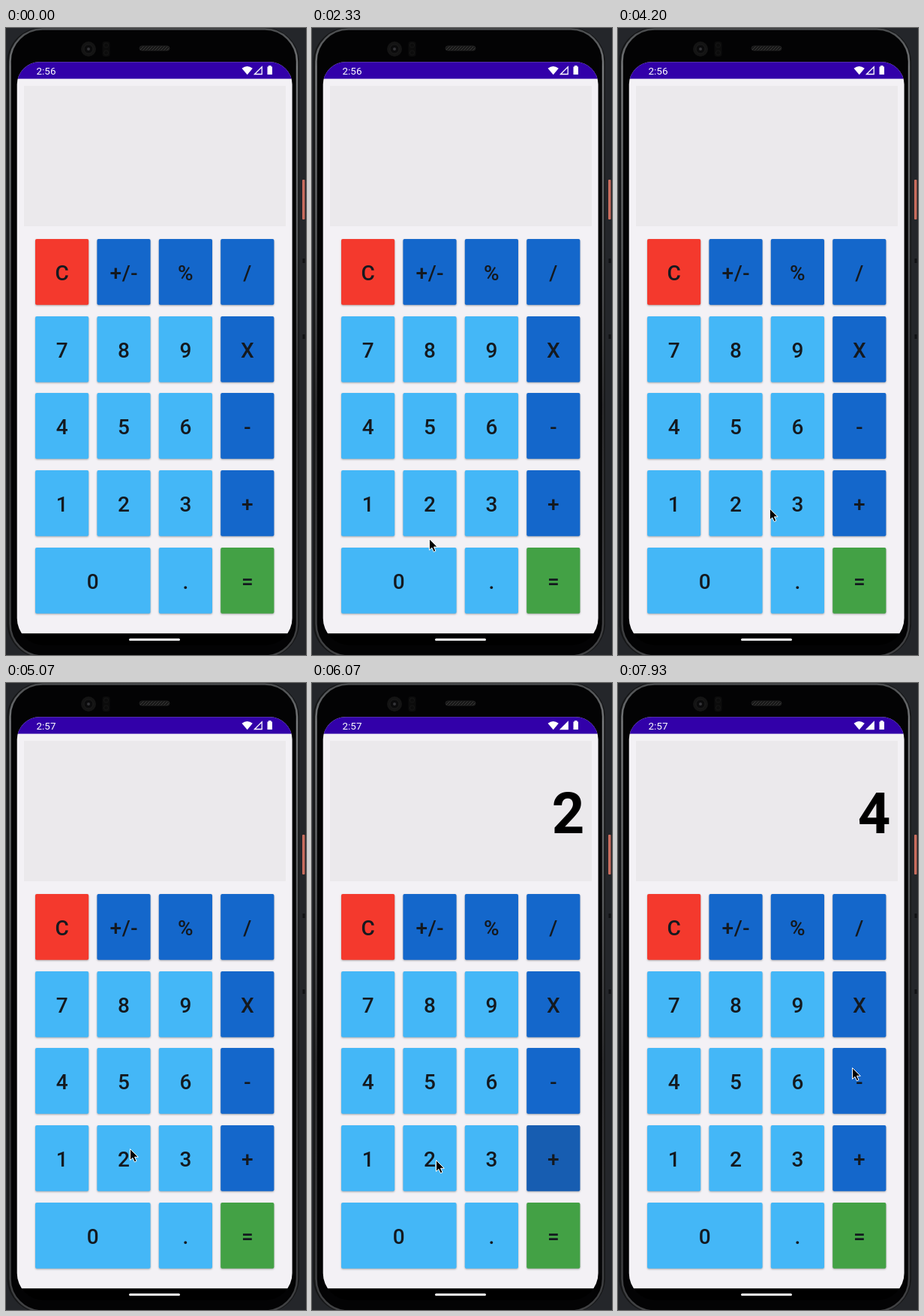
An HTML page for the animation above (8 s loop, 400 by 835 pixels).

```html
<!DOCTYPE html>
<html lang="en">
<head>
<meta charset="utf-8">
<title>Calculator</title>
<style>
html, body { margin: 0; width: 100%; height: 100%; overflow: hidden; background: #24262a; }
svg { display: block; width: 100%; height: 100%; }
text { font-family: Roboto, sans-serif; }
.key { filter: drop-shadow(0 1.5px 1px rgba(0, 0, 0, .3)); }
.label { font-size: 28px; font-weight: 500; letter-spacing: .6px; fill: #14191f; text-anchor: middle; }
</style>
</head>
<body>
<svg viewBox="0 0 400 835" xmlns="http://www.w3.org/2000/svg">
  <defs>
    <linearGradient id="rim" x1="0" y1="0" x2="0" y2="1">
      <stop offset="0" stop-color="#4a4c4e"/>
      <stop offset=".06" stop-color="#77797b"/>
      <stop offset=".35" stop-color="#56585a"/>
      <stop offset=".6" stop-color="#2c2c2e"/>
      <stop offset="1" stop-color="#404143"/>
    </linearGradient>
    <pattern id="grill" width="4" height="4" patternUnits="userSpaceOnUse">
      <rect width="4" height="4" fill="#171717"/>
      <path d="M0 4L4 0" stroke="#3a3a3a"/>
    </pattern>
    <clipPath id="screen">
      <path d="M14.700 75A30 30 0 0 1 44.700 45.300H351.600A30 30 0 0 1 381.600 75V786A36 36 0 0 1 345.600 822H50.700A36 36 0 0 1 14.700 786Z"/>
    </clipPath>
  </defs>

  <rect width="400" height="835" fill="#24262a"/>
  <rect x="1.500" y="-.5" width="389.500" height="839" rx="46" fill="#161718"/>
  <rect x="5.500" y="1.500" width="382.500" height="835" rx="43" fill="#030304" stroke="url(#rim)" stroke-width="2.500"/>
  <rect x="395" y="202" width="3.500" height="53" rx="1" fill="#c96d5e"/>
  <path d="M397 307v6M397 408v6" stroke="#101113" stroke-width="3"/>
  <circle cx="110" cy="28" r="10" fill="#141414"/>
  <circle cx="110" cy="28" r="6" fill="#0b0b0c" stroke="#1c1c1c"/>
  <circle cx="110" cy="28" r="2" fill="#343438"/>
  <rect x="128.500" y="18" width="10" height="20" rx="3" fill="#0c0c0c"/>
  <circle cx="133.500" cy="23" r="3" fill="none" stroke="#161616"/>
  <circle cx="133.500" cy="33" r="3" fill="none" stroke="#161616"/>
  <rect x="178" y="24" width="40" height="6" rx="3" fill="url(#grill)" stroke="#202020"/>

  <g clip-path="url(#screen)">
    <rect x="14" y="45" width="368" height="761.500" fill="#f3f1f5"/>
    <rect x="14" y="45" width="368" height="22.600" fill="#3200a9"/>
    <rect x="14" y="806.500" width="368" height="20" fill="#000"/>
  </g>
  <text id="clock" x="40.600" y="62" font-size="13.400" fill="#fff"></text>
  <path d="M314.500 53.800Q321.500 48 328.800 53.800L321.700 62.300Z" fill="#fff"/>
  <path id="signal" d="M331.500 61.500L341.200 51.800V61.500Z" stroke="#fff" stroke-width="1.300"/>
  <path d="M348.500 51.500H350V50H353.500V51.500H355V62H348.500Z" fill="#fff"/>
  <rect x="24" y="77" width="349" height="187" fill="#ebe9ec"/>
  <text id="display" x="363.400" y="200.300" font-size="76" font-weight="700" text-anchor="end"></text>
  <g id="keys"></g>
  <rect x="164" y="813" width="68" height="3" rx="1.500" fill="#f4f4f4"/>
  <path id="cursor" d="M.5 .5V15.500L3.900 12.400L6.400 17.800L9 16.600L6.600 11.300H11.300Z"
    fill="#000" stroke="#fff" stroke-width="1"/>
</svg>
<script>
const LOOP = 8000, STEP = 200 / 3;
const $ = id => document.getElementById(id);
const clamp = v => Math.max(0, Math.min(1, v));

function add(parent, tag, attrs, text = '') {
  const el = document.createElementNS('http://www.w3.org/2000/svg', tag);
  for (const name in attrs) el.setAttribute(name, attrs[name]);
  el.textContent = text;
  parent.append(el);
  return el;
}

const colors = { C: '#f4392d', '=': '#43a145' };
const rows = [['C', '+/-', '%', '/'], ['7', '8', '9', 'X'], ['4', '5', '6', '-'],
  ['1', '2', '3', '+'], ['0', null, '.', '=']];
const keys = {};

rows.forEach((row, r) => row.forEach((name, c) => {
  if (!name) return;
  const x = 39 + c * 82.4, y = Math.floor(281.4 + r * 102.65), width = name === '0' ? 153.6 : 71.2;
  const fill = colors[name] || (c === 3 || r === 0 ? '#1467cb' : '#44b7f7');
  const box = { x, y, width, height: 87.7, rx: 2 };
  add($('keys'), 'rect', { ...box, fill, class: 'key' });
  const clip = add($('keys'), 'clipPath', { id: `clip${r}${c}` });
  add(clip, 'rect', box);
  keys[name] = add($('keys'), 'circle', { fill: '#262b30', opacity: 0, 'clip-path': `url(#clip${r}${c})` });
  add($('keys'), 'text', { x: x + width / 2 + .3, y: y + 55, class: 'label' }, name);
}));

// time, x, y of the pointer tip
const path = [[930, 18, 790], [1300, 104, 712], [1700, 104, 712], [3000, 212, 645],
  [3900, 212, 645], [4900, 165, 620], [5330, 165, 620], [5600, 318, 636],
  [5780, 318, 636], [6020, 165, 635], [6620, 165, 635], [6920, 320, 731],
  [7160, 320, 731], [7700, 312, 512], [LOOP, 312, 512]];
const presses = [[5270, '2', 165, 622], [5700, '+', 318, 636], [6560, '2', 165, 635], [7030, '=', 320, 731]];

function pointerAt(t) {
  const i = Math.max(1, path.findIndex(p => p[0] > t));
  const [t0, x0, y0] = path[i - 1], [t1, x1, y1] = path[i];
  const k = clamp((t - t0) / (t1 - t0)), e = k * k * (3 - 2 * k);
  return [x0 + (x1 - x0) * e, y0 + (y1 - y0) * e];
}

function draw(t) {
  $('clock').textContent = t < 4400 ? '2:56' : '2:57';
  $('signal').setAttribute('fill', t < 5600 ? 'none' : '#fff');
  $('display').textContent = t < 5330 ? '' : t < 7040 ? '2' : '4';
  $('cursor').style.display = t < path[0][0] ? 'none' : '';
  $('cursor').setAttribute('transform', `translate(${pointerAt(t)})`);
  for (const name in keys) keys[name].setAttribute('opacity', 0);
  for (const [start, name, cx, cy] of presses) {
    const age = t - start;
    if (age < 0 || age > 700) continue;
    const ripple = keys[name];
    ripple.setAttribute('cx', cx);
    ripple.setAttribute('cy', cy);
    ripple.setAttribute('r', 110 * clamp(age / 260));
    ripple.setAttribute('opacity', .2 * clamp(age / 70) * clamp((700 - age) / 400));
  }
}

function tick() {
  const t = performance.now() % LOOP;
  draw(Math.floor(t / STEP + .1) * STEP);
  requestAnimationFrame(tick);
}
tick();
</script>
</body>
</html>
```
